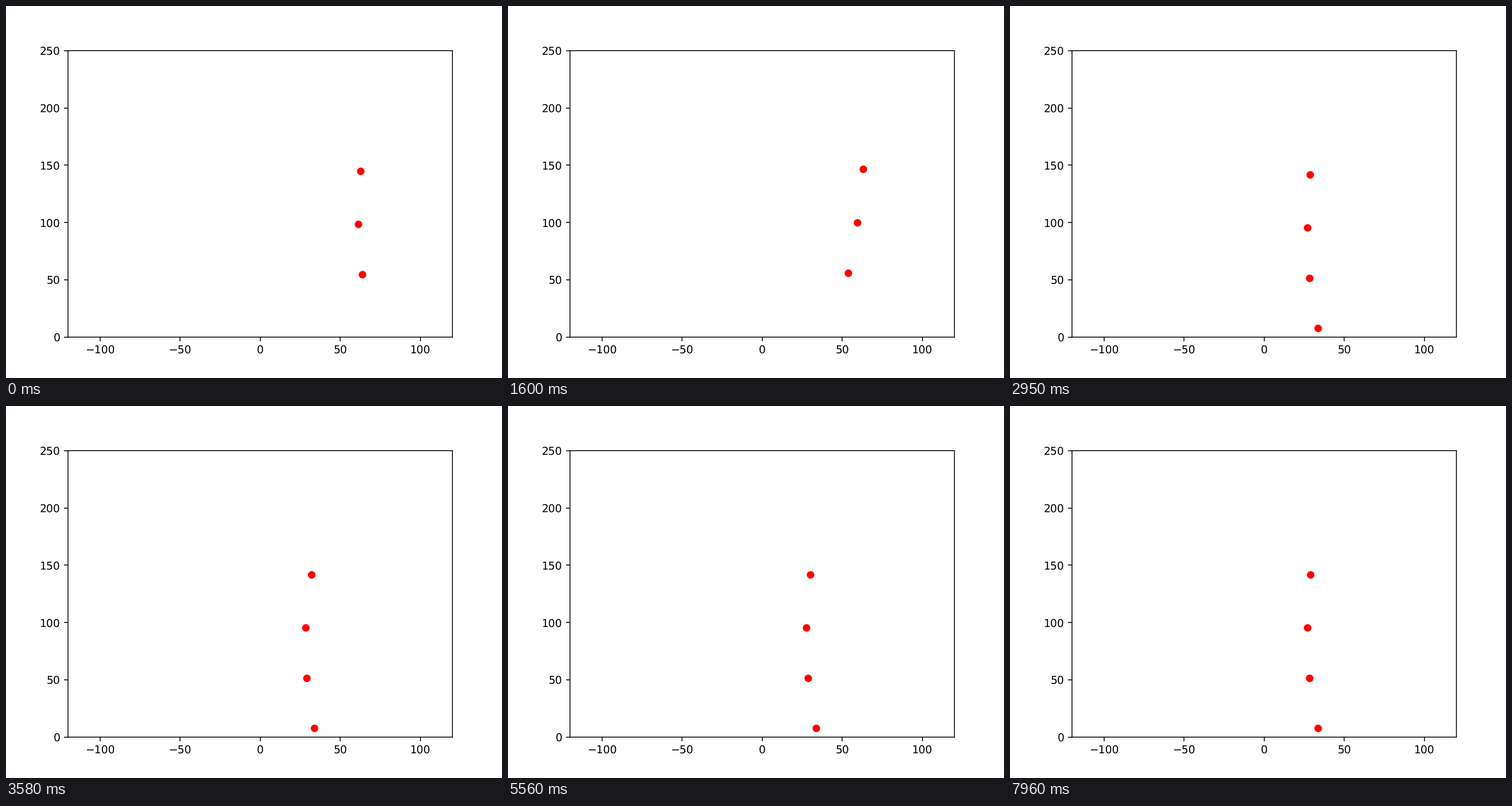
Animation, 864 px wide and 648 px high, one loop 7.99 s. Source, as a matplotlib script:

```python
import math
from collections import namedtuple

import matplotlib.pyplot as plt
from matplotlib.animation import FuncAnimation
from matplotlib.patches import Circle
from matplotlib.transforms import IdentityTransform

WIDTH, HEIGHT, DPI = 864, 648, 135
FRAMES, INTERVAL = 235, 34
RADIUS = 3.5 * DPI / 72

# Positions are stage pixels with y down, times are ms.
# drift: early wander; move: span of the slide from start to rest;
# sway: swing after the slide; lean: shift at the end; shown: first visible time
Joint = namedtuple("Joint", "start drift rest move sway lean shown")
JOINTS = [
    Joint((618, 288), (1, -3.5), (529.8, 294.2), (1620, 2420), 11, -6, 0),
    Joint((614, 380.3), (-5, -2.6), (521.2, 386.5), (1580, 2400), 4.5, -2.8, 0),
    Joint((621, 468), (-1, -2.5), (523.6, 474.4), (1195, 2350), 2.5, -1.6, 0),
    Joint((537.3, 560.5), (0, 0), (537.3, 561.5), (1600, 2100), 0.8, -0.5, 1850),
]


def ease(t, begin, end):
    u = min(max((t - begin) / (end - begin), 0), 1)
    return u * u * (3 - 2 * u)


def swing(t):
    """Slow swing that fades in and out."""
    u = min(max((t - 2000) / 3860, 0), 1)
    return math.sin(math.pi * u) * math.sin(2 * math.pi * (t - 3450) / 2900)


def position(joint, t):
    wander = ease(t, 0, 1200)
    x, y = (s + d * wander for s, d in zip(joint.start, joint.drift))
    x += (joint.rest[0] - x) * ease(t, *joint.move)
    y += (joint.rest[1] - y) * ease(t, 1600, 2100)
    x += joint.sway * swing(t) + joint.lean * ease(t, 7420, 7960)
    return x, y


plt.rcParams["text.hinting"] = "none"
fig, ax = plt.subplots(figsize=(WIDTH / DPI, HEIGHT / DPI), dpi=DPI)
ax.set_xlim(-120, 120)
ax.set_ylim(0, 250)
for spine in ax.spines.values():
    spine.set_snap(False)

# Circles in pixel space move smoothly, where markers would jump by whole pixels.
dots = [Circle((0, 0), RADIUS, facecolor="red", edgecolor="none",
               transform=IdentityTransform(), zorder=3) for _ in JOINTS]
for dot in dots:
    ax.add_artist(dot)


def update(i):
    t = i * INTERVAL
    for dot, joint in zip(dots, JOINTS):
        x, y = position(joint, t)
        dot.center = x, HEIGHT - y
        dot.set_visible(t >= joint.shown)
    return dots


anim = FuncAnimation(fig, update, frames=FRAMES, interval=INTERVAL,
                     blit=True, repeat=True, repeat_delay=0)
plt.show()
```
